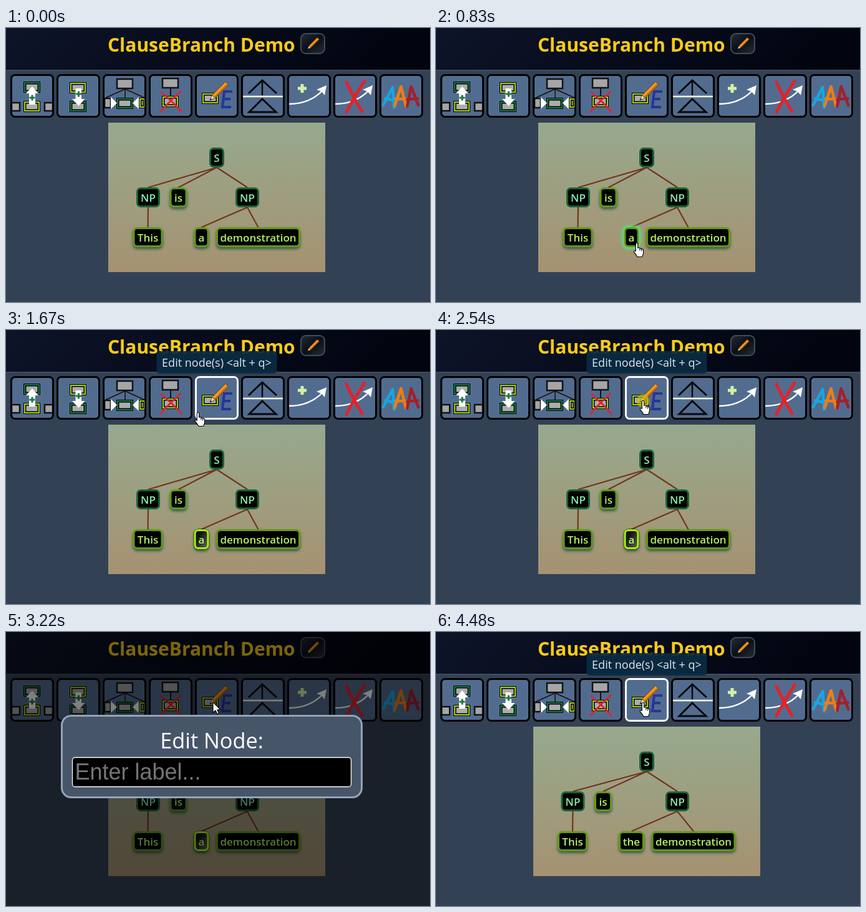
Write an HTML page that moves like this. It is 680 px wide and 440 px high and loops after 6610 ms.

```html
<!DOCTYPE html>
<html lang="en">
<head>
<meta charset="utf-8">
<title>Syntax tree editor demo</title>
<style>
html, body { margin: 0; width: 100%; height: 100%; overflow: hidden; background: #334155; }
svg { display: block; font-family: "Open Sans", "Noto Sans", sans-serif; }
.node { font-size: 17px; font-weight: 600; text-anchor: middle; }
.leaf { filter: drop-shadow(0 3px 2px rgba(0, 60, 45, .65)); }
.glow { filter: drop-shadow(0 0 3px #5f8) drop-shadow(0 0 3px #4ade80); }
.tip { font-size: 18px; fill: #e2e8f0; text-anchor: middle; }
.field { font: 36px "Liberation Sans", Arial, sans-serif; }
</style>
</head>
<body>
<svg width="680" height="440" viewBox="0 0 680 440">
  <defs>
    <linearGradient id="bar" x2="1" y2=".1">
      <stop stop-color="#0e1429"/><stop offset=".5" stop-color="#070b1b"/><stop offset="1" stop-color="#02040f"/>
    </linearGradient>
    <linearGradient id="paper" x2="0" y2="1">
      <stop stop-color="#97a98d"/><stop offset="1" stop-color="#a59271"/>
    </linearGradient>
    <linearGradient id="picked" x2="1" y2="1">
      <stop offset=".3" stop-color="#111"/><stop offset="1" stop-color="#666"/>
    </linearGradient>
    <linearGradient id="key" x2="1" y2="1">
      <stop stop-color="#252c35"/><stop offset=".5" stop-color="#0b0f17"/><stop offset="1" stop-color="#232f36"/>
    </linearGradient>
  </defs>
  <g id="base"></g>
  <g id="live"></g>
</svg>
<script>
const LOOP = 6610, STEP = 70;
const GREEN = '#1b7a42', LIME = '#a3d31c', WHITE = '#fff', BLACK = '#000', RED = '#e3222a';
const $ = id => document.getElementById(id);

const rect = (x, y, w, h, fill, extra = '') =>
  `<rect x="${x}" y="${y}" width="${w}" height="${h}" fill="${fill}" ${extra}/>`;
const line = (d, color, width, extra = '') =>
  `<path d="${d}" fill="none" stroke="${color}" stroke-width="${width}" ${extra}/>`;
const shape = (d, fill, extra = '') => `<path d="${d}" fill="${fill}" ${extra}/>`;
const round = 'stroke-linecap="round" stroke-linejoin="round"';

// ---- toolbar ----
const frame = (i, color) =>
  rect(8.5 + 74 * i, 75.5, 67, 67, 'none', `rx="6" stroke="${color}" stroke-width="3"`);

function box(x, y, color, w = 27, h = 18) {
  return rect(x, y, w, h, BLACK) + rect(x + 1, y + 1, w - 2, h - 2, color) +
    rect(x + 3, y + 3, w - 6, h - 6, BLACK) + rect(x + 4.5, y + 4.5, w - 9, h - 9, '#adadad');
}
const plainBox = (x, y, w = 27, h = 17) =>
  rect(x + 1, y + 1, w - 2, h - 2, '#a6a6a6', 'stroke="#111" stroke-width="2.5"');
const plus = (x, y, r, color, width) =>
  line(`M${x - r} ${y}h${2 * r}M${x} ${y - r}v${2 * r}`, color, width);
const swoosh = x =>
  line(`M${x + 3} 122Q${x + 36} 122 ${x + 57} 100`, WHITE, 2.5) +
  shape(`M${x + 63} 92L${x + 60} 108L${x + 55} 102L${x + 47} 99Z`, WHITE);

function pencil(x, y, s) {
  return `<g transform="translate(${x} ${y}) scale(${s}) rotate(-45)">` +
    shape('M0 0L8-3.2V3.2Z', '#f2dfbd', 'stroke="#222" stroke-width=".7"') +
    shape('M0 0L3-1.2V1.2Z', '#222') +
    rect(8, -3.2, 29, 6.4, '#f29a1f', 'stroke="#5a2c0c" stroke-width=".8"') +
    rect(8, .8, 29, 2, '#c86a12') + '</g>';
}
const letterA = (x, y, angle, color) =>
  `<g transform="translate(${x} ${y}) rotate(${angle})">` +
  line('M-9 16L0-15L9 16M-8 5H9', color, 4.6, round) + '</g>';

const icons = [
  plainBox(8, 119, 15, 15) + plainBox(61, 119, 15, 15) + box(28, 86, GREEN) + box(28, 117, LIME) +
    shape('M42 94L52 105H47V123H37V105H32Z', WHITE) + plus(42, 112, 4.5, GREEN, 3),
  box(102, 87, LIME) + box(102, 117, GREEN) +
    shape('M111.500 97H121V114H126.500L116.500 125L106 114H111.500Z', WHITE) + plus(116.500, 106, 4.5, GREEN, 3),
  line('M191 98L160 112M191 98V112M191 98L222 112', '#111', 1.5) + plainBox(177, 81) +
    plainBox(157, 112, 12, 17) + box(177, 112, GREEN) + box(213, 112, LIME, 11, 17) +
    shape('M168 111L178 120.500L168 130ZM213 111L203 120.500L213 130Z', WHITE),
  line('M264 97V110', '#111', 2) + plainBox(250, 80) + box(250, 109, LIME) +
    line('M249 103Q266 117 281 134M280 102Q264 116 248 134', RED, 2.8, round),
  box(314, 104, LIME) + pencil(327, 116, 1.05) +
    line('M363 102H350L347 127H361M349 114H360', '#26349b', 4),
  line('M389 105L411 84L434 105M390 135L411 114L433 135Z', '#080808', 3) +
    line('M411 84V108', '#080808', 2.5) + line('M380 110H444', WHITE, 2.5),
  plus(475, 97, 7, '#d5f0a5', 5) + swoosh(451),
  swoosh(525) + line('M546 87Q556 110 571 134M575 85Q560 108 546 135', RED, 5, round),
  letterA(617, 110, 12, '#18a5e0') + letterA(633, 109, 2, '#ee7d18') + letterA(651, 109, -5, '#a3202b')
];

$('base').innerHTML =
  rect(0, 0, 680, 440, '#334155') + rect(0, 0, 680, 67, 'url(#bar)') + rect(0, 67, 680, 2, '#3f4d63') +
  '<text x="163" y="37.500" font-size="30" font-weight="700" fill="#facc15">ClauseBranch Demo</text>' +
  rect(473, 9, 38, 32, 'url(#key)', 'rx="8" stroke="#424b57" stroke-width="2"') + pencil(483.500, 34, .66) +
  icons.map((art, i) => rect(8.5 + 74 * i, 75.5, 67, 67, '#526c8f', 'rx="6"') + art + frame(i, BLACK)).join('');

// ---- tree ----
function node(label, x, y, w, leaf, state) {
  const picked = state === 'picked';
  const border = picked ? '#aaff00' : leaf ? '#619b10' : '#166534';
  const outline = picked ? rect(x - w / 2 - .5, y - .5, w + 1, 33, BLACK, 'rx="8"') : '';
  const body = outline +
    rect(x - w / 2 + 1.5, y + 1.5, w - 3, 29, picked ? 'url(#picked)' : BLACK,
      `rx="5.500" stroke="${border}" stroke-width="3"`) +
    `<text class="node" x="${x}" y="${y + 22.5}" fill="${leaf ? '#b5f264' : '#86efac'}">${label}</text>`;
  return `<g class="${state === 'glow' ? 'glow' : leaf ? 'leaf' : ''}">${body}</g>`;
}

function tree(edited, state) {
  const d = edited ? 8.5 : 0;
  const left = 228 - d, is = 276.5 - d, right = 404.5 + d;
  const edge = (x1, y, x2) => `M${x1} ${y}L${x2} ${y + 32}`;
  return rect(164 - (edited ? 8 : 0), 152, edited ? 364 : 348, 240, 'url(#paper)') +
    line(edge(338, 224, left) + edge(338, 224, is) + edge(338, 224, 387) +
      edge(left, 288, left - .5) + edge(387, 288, 313.5) + edge(387, 288, right), '#73351c', 2.2) +
    node('S', 338, 192, 24) + node('NP', left, 256, 38) + node('is', is, 256, 28, true) +
    node('NP', 387, 256, 38) + node('This', left - .5, 320, 48, true) +
    node(edited ? 'the' : 'a', 313.5, 320, edited ? 41 : 24, true, state) +
    node('demonstration', right, 320, 135, true);
}

// ---- overlays ----
const tips = {
  3: ['Delete node(s) &lt;alt + d&gt;', 264.5, 213],
  4: ['Edit node(s) &lt;alt + q&gt;', 338, 193]
};
function hover(i) {
  const [label, x, w] = tips[i];
  return frame(i, WHITE) + rect(x - w / 2, 34, w, 36, '#0a2b42', 'rx="5" opacity=".94"') +
    `<text class="tip" x="${x}" y="59">${label}</text>`;
}

function dialog(t) {
  const typed = 'the'.slice(0, t < 3750 ? 0 : t < 3850 ? 1 : t < 3950 ? 2 : 3);
  const caret = 111 + [0, 10, 30, 50][typed.length];
  const caretOn = t < 3220 || t >= 3750;
  return rect(0, 0, 680, 440, BLACK, 'opacity=".5"') +
    rect(89.5, 134.5, 481, 131, '#475569', 'rx="15" stroke="#94a3b8" stroke-width="3"') +
    '<text x="330" y="187" font-size="34.300" fill="#fff" text-anchor="middle">Edit Node:</text>' +
    rect(106.5, 201.5, 447, 47, BLACK, 'rx="4" stroke="#fff" stroke-width="1.300"') +
    `<text class="field" x="110.500" y="237" fill="${typed ? '#7dd3fc' : '#757575'}">${typed || 'Enter label...'}</text>` +
    (caretOn ? rect(caret, 205, 1, 40, typed ? '#7dd3fc' : WHITE) : '');
}

// ---- pointer ----
const ARROW = 'M0 0V17L4 13.300L6.700 19.200L9.300 18L6.800 12.300H12Z';
const HAND = 'M4 13V2.500Q4 .7 5.700 .7T7.400 2.500V9Q8 8 9.200 8.300T10.600 9.600Q12 8.800 13.400 10.400' +
  'Q15.500 10 16.300 12V16Q16 19 14.300 23H6.500Q5 19.500 1.200 15.500Q.5 13.600 2 13Q3 12.800 4 14ZM10.600 10V13M13.400 11V14';
const climb = [[321, 330], [315, 290], [308, 240], [302, 192], [298, 156], [297, 139], [308, 132], [313, 127], [317, 123], [319, 120]];

function pointerAt(t) {
  if (t < 200) return null;
  if (t < 1250) {
    const p = Math.min(9, Math.floor((t - 200) / STEP)) / 9;
    const e = 1 - (1 - p) ** 2;
    return [583 - 261 * e, 432 - 87 * e];
  }
  return t < 2080 ? climb[Math.min(9, Math.floor((t - 1250) / STEP))] : [332, 113];
}

const pointer = ([x, y], hand) =>
  `<g transform="translate(${hand ? x - 5.7 : x} ${y - .5})">` +
  shape(hand ? HAND : ARROW, WHITE, 'stroke="#000" stroke-width="1.100" stroke-linejoin="round"') + '</g>';

const ripple = ([x, y], r, alpha) =>
  `<circle cx="${x}" cy="${y + 1}" r="${r}" fill="#c8be00" opacity="${alpha}"/>`;

function scene(t) {
  const at = pointerAt(t), edited = t >= 4480, editing = t >= 2670 && !edited;
  const onNode = at && at[0] < 326 && at[1] > 320 && at[1] < 354;
  const onButton = at && !editing && at[1] > 74 && at[1] < 144;
  const state = edited ? '' : t >= 1250 ? 'picked' : onNode ? 'glow' : '';
  let out = tree(edited, state);
  if (onButton) out += hover(Math.floor((at[0] - 7) / 74));
  if (editing) out += dialog(t);
  if (t >= 960 && t < 1030 || t >= 2540 && t < 2670) out += ripple(at, 10.5, .65);
  if (t >= 1030 && t < 1100) out += ripple([320, 345], 14.5, .35);
  if (at) out += pointer(at, onNode || onButton);
  return out;
}

let shown;
function tick() {
  const next = scene(performance.now() % LOOP);
  if (next !== shown) $('live').innerHTML = shown = next;
  requestAnimationFrame(tick);
}
tick();
</script>
</body>
</html>
```
